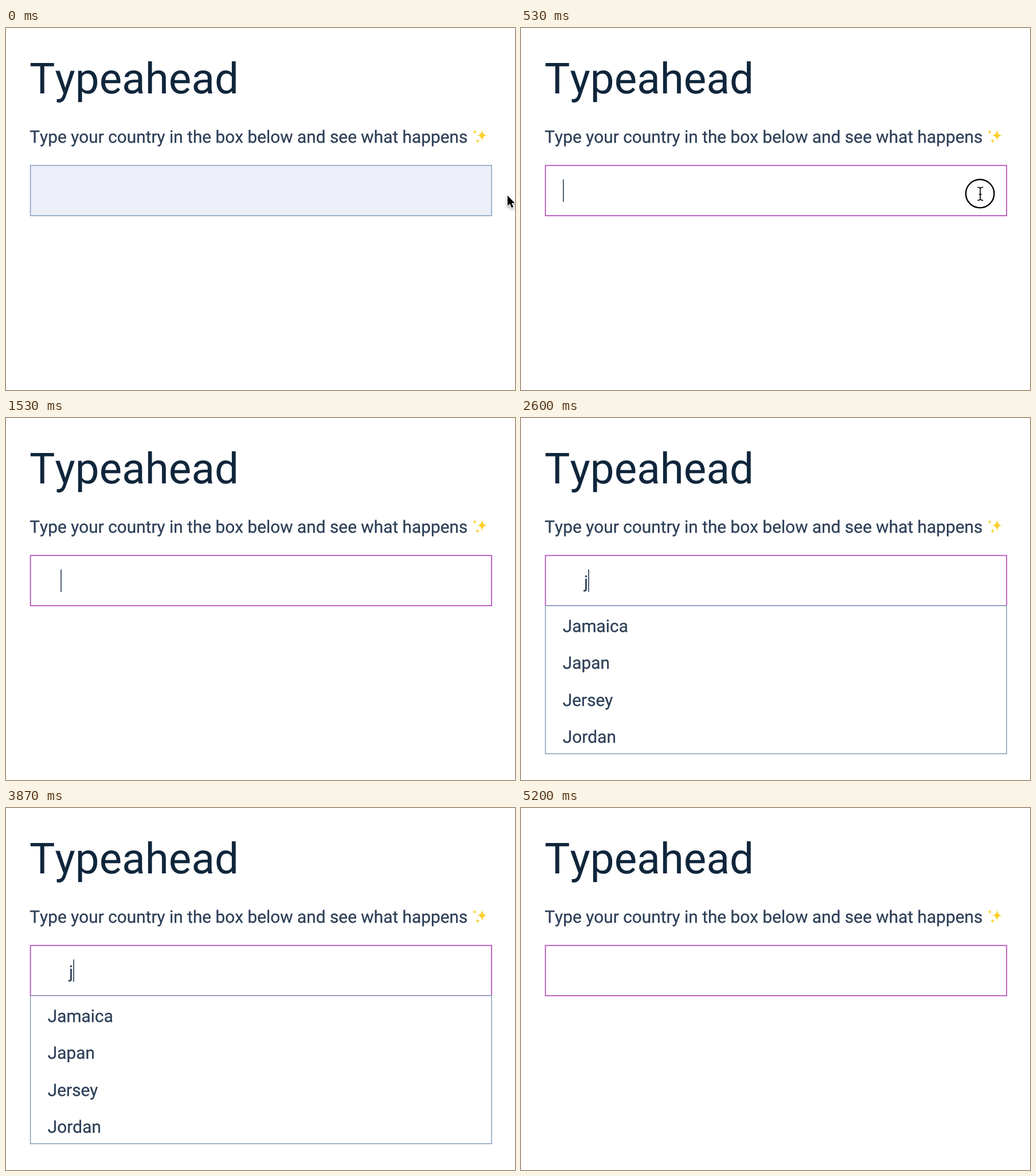
Write an HTML page with a canvas that moves like this. It is 888 by 631 pixels and loops after 5.74 s.

```html
<!DOCTYPE html>
<html lang="en">
<head>
<meta charset="utf-8">
<title>Typeahead</title>
<style>
  html, body { margin: 0; width: 100%; height: 100%; overflow: hidden; background: #fff; }
  canvas { display: block; width: 888px; height: 631px; }
</style>
</head>
<body>
<canvas id="stage" width="888" height="631"></canvas>
<script>
const ctx = document.getElementById('stage').getContext('2d');
const LOOP = 5740;
const REM = 29.82;
const BOX = { left: 41.8, right: 848, top: 238.8, middle: 328, bottom: 586 };
const COLOR = {
  title: '#10263c', text: '#2d3f57', field: '#eceff7',
  border: '#8ba3c1', focus: '#ad3fb8', caret: '#243b55', star: '#fbd02c'
};
const COUNTRIES = ['Jamaica', 'Japan', 'Jersey', 'Jordan'];

// Moments of the story, in ms.
const MOVE = 130, CLICK = 530, TYPE = 1070, LIST_OPEN = 2600, BLINK_OFF = 3200,
      BLINK_ON = 3730, LIST_CLOSE = 4130, ERASE = 4730, LAST_BLINK = 5200;

const clamp = (v, min, max) => Math.min(max, Math.max(min, v));
const between = (t, start, end) => t >= start && t < end;
const smooth = p => p * p * (3 - 2 * p);
// Number of repeats so far of an action that first happens at start.
const repeats = (t, start, every, max) => clamp(Math.floor((t - start) / every) + 1, 0, max);

const isOpen = t => between(t, LIST_OPEN, LIST_CLOSE);
const caretShown = t => between(t, CLICK, LAST_BLINK) && !between(t, BLINK_OFF, BLINK_ON);
const spacesTyped = t => repeats(t, TYPE, 230, 5) - repeats(t, ERASE, 70, 3);

function text(str, x, y, size, color, weight = 0) {
  ctx.font = `400 ${size}px Roboto, sans-serif`;
  ctx.fontKerning = 'none';
  ctx.textRendering = 'geometricPrecision';
  ctx.fillStyle = ctx.strokeStyle = color;
  ctx.fillText(str, x, y);
  if (weight) {
    ctx.lineWidth = weight;
    ctx.lineJoin = 'round';
    ctx.strokeText(str, x, y);
  }
}

const bodyText = (str, x, y) => text(str, x, y, REM, COLOR.text, 0.3);

function frame(top, bottom, color) {
  const line = 1.6;
  ctx.strokeStyle = color;
  ctx.lineWidth = line;
  ctx.lineJoin = 'miter';
  ctx.strokeRect(BOX.left + line / 2, top + line / 2, BOX.right - BOX.left - line, bottom - top - line);
}

function star(x, y, rx, ry) {
  const pinch = -0.06;
  ctx.beginPath();
  ctx.moveTo(x + rx, y);
  for (let i = 0; i < 4; i++) {
    const mid = (i + 0.5) * Math.PI / 2, end = (i + 1) * Math.PI / 2;
    ctx.quadraticCurveTo(
      x + rx * pinch * Math.cos(mid), y + ry * pinch * Math.sin(mid),
      x + rx * Math.cos(end), y + ry * Math.sin(end));
  }
  ctx.fillStyle = COLOR.star;
  ctx.fill();
}

function arrow(x, y) {
  ctx.save();
  ctx.translate(x, y + 1);
  const shape = new Path2D('M0 0V18L4.1 14.2L7.1 21.3L10.1 20L7.1 13.2H12.6Z');
  ctx.lineWidth = 2.4;
  ctx.strokeStyle = '#fff';
  ctx.shadowColor = 'rgba(0,0,0,0.4)';
  ctx.shadowBlur = 4;
  ctx.shadowOffsetY = 2;
  ctx.stroke(shape);
  ctx.shadowColor = 'transparent';
  ctx.fillStyle = '#000';
  ctx.fill(shape);
  ctx.restore();
}

function strokeOutlined(path) {
  for (const [color, width] of [['#fff', 3.4], ['#000', 1.7]]) {
    ctx.strokeStyle = color;
    ctx.lineWidth = width;
    ctx.stroke(path);
  }
}

function textCursor(x, y) {
  ctx.save();
  ctx.translate(x + 0.3, y);
  const shape = new Path2D('M0 -8.5V8.5M-2.5 1H2.5');
  for (const s of [-1, 1]) {
    shape.moveTo(-5, 11.5 * s);
    shape.quadraticCurveTo(0, 11.5 * s, 0, 8 * s);
    shape.quadraticCurveTo(0, 11.5 * s, 5, 11.5 * s);
  }
  strokeOutlined(shape);
  ctx.restore();
}

function clickRing(x, y, alpha) {
  ctx.save();
  ctx.globalAlpha = alpha;
  ctx.beginPath();
  ctx.arc(x, y, 24.7, 0, Math.PI * 2);
  ctx.strokeStyle = '#000';
  ctx.lineWidth = 2.4;
  ctx.stroke();
  ctx.restore();
}

function drawField(t) {
  const focused = t >= CLICK;
  const open = isOpen(t);
  ctx.fillStyle = focused ? '#fff' : COLOR.field;
  ctx.fillRect(BOX.left, BOX.top, BOX.right - BOX.left, BOX.middle - BOX.top);
  frame(BOX.top, BOX.middle, focused ? COLOR.focus : COLOR.border);

  if (open) {
    frame(BOX.middle - 1.6, BOX.bottom, COLOR.border);
    COUNTRIES.forEach((name, i) => bodyText(name, 72.8, 373.2 + i * 64.2));
  }

  const typed = ' '.repeat(spacesTyped(t)) + (open ? 'j' : '');
  bodyText(typed, 73.1, 295.5);
  if (caretShown(t)) {
    ctx.fillStyle = COLOR.caret;
    ctx.fillRect(73.1 + ctx.measureText(typed).width, 264, 1.6, 39);
  }
}

function drawPointer(t) {
  if (t >= TYPE) return;
  const p = smooth(repeats(t, MOVE, 66, 4) / 4);
  const x = 875 - 74 * p, y = 291 - 2 * p;
  if (t >= CLICK) clickRing(x - 0.3, y - 0.3, clamp((CLICK + 210 - t) / 140, 0, 1));
  (x < BOX.right ? textCursor : arrow)(x, y);
}

function draw(t) {
  ctx.fillStyle = '#fff';
  ctx.fillRect(0, 0, 888, 631);
  text('Typeahead', 41.1, 114, REM * 2.5, COLOR.title);
  bodyText('Type your country in the box below and see what happens', 41.3, 200);
  star(830.5, 187.3, 10.8, 13);
  star(817.7, 181, 4.5, 5.5);
  star(822.7, 197, 4.6, 5.4);
  drawField(t);
  drawPointer(t);
}

const begin = performance.now();
function tick() {
  draw((performance.now() - begin) % LOOP);
  requestAnimationFrame(tick);
}
tick();
</script>
</body>
</html>
```
